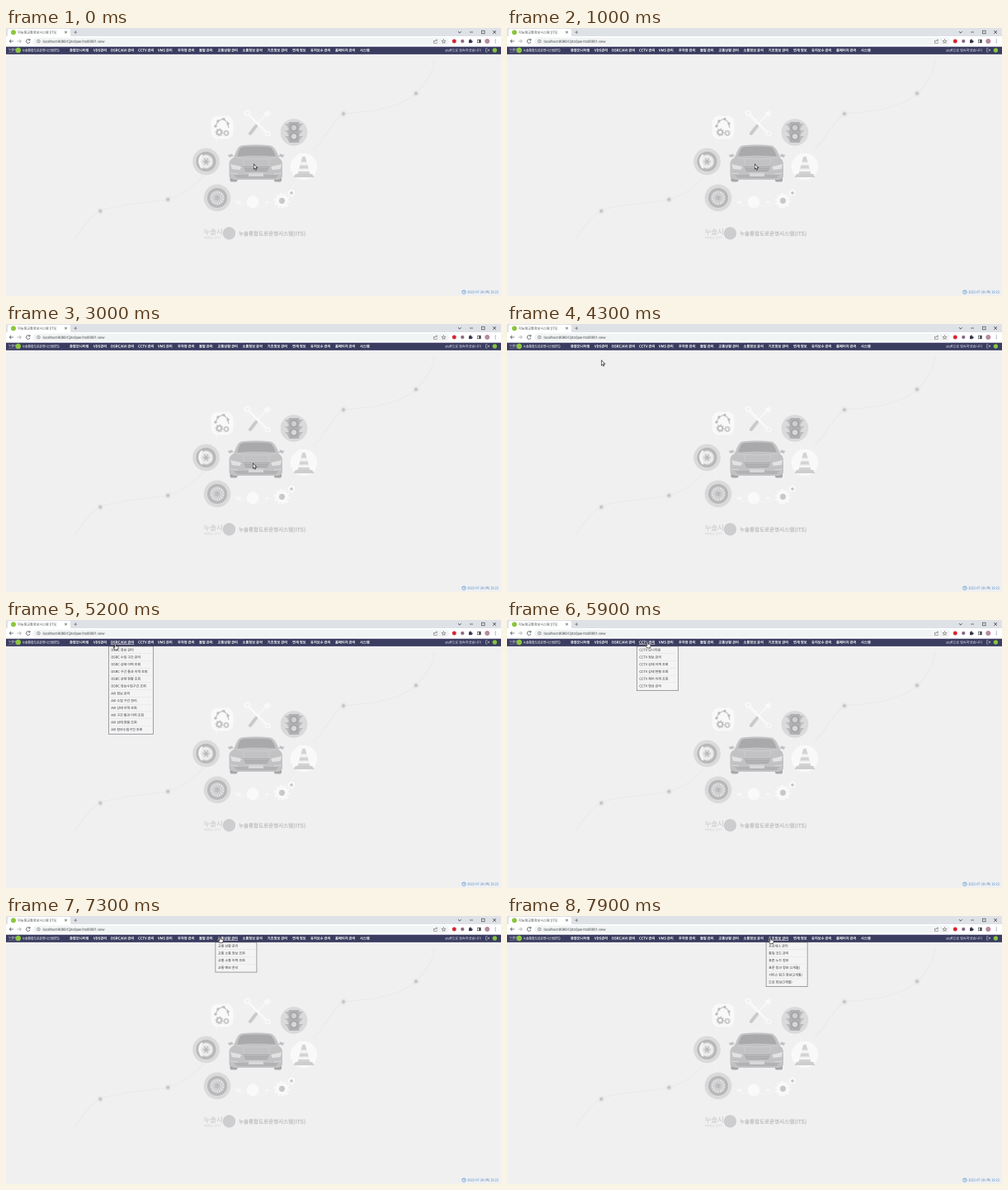
Animation, 600 px wide and 325 px high, one loop 8000 ms. Source, as an HTML page with a canvas:

```html
<!DOCTYPE html>
<html lang="ko">
<head>
<meta charset="utf-8">
<title>지능형교통정보시스템 [ITS]</title>
<style>
html, body { margin: 0; width: 100%; height: 100%; overflow: hidden; background: #f0f0f1; }
canvas { display: block; width: 600px; height: 325px; }
</style>
</head>
<body>
<canvas id="stage"></canvas>
<script>
const W = 600, H = 325, LOOP = 8000, STEP = 100;
const DETAIL = 4; // drawn large, then reduced, so that tiny text stays smooth

function sized(canvas, scale) {
  canvas.width = W * scale;
  canvas.height = H * scale;
  return canvas;
}
const stage = sized(document.getElementById('stage'), window.devicePixelRatio || 1);
const view = stage.getContext('2d');
const scene = sized(document.createElement('canvas'), DETAIL);
const ctx = scene.getContext('2d');
ctx.scale(DETAIL, DETAIL);
ctx.textRendering = 'geometricPrecision';
view.imageSmoothingQuality = 'high';

const KR = '"Noto Sans CJK KR", "Noto Sans CJK", "Noto Sans", sans-serif';
const LATIN = 'Roboto, "Noto Sans", sans-serif';
const SYSTEM = '누솔통합도로운영시스템(ITS)';

const dsrc = ['정보 관리', '수집 구간 관리', '상태 이력 조회', '구간 통과 이력 조회', '상태 현황 조회', '정보수집구간 조회'];
const prefix = (name, list) => list.map(s => name + ' ' + s);

// label, x, menu width, menu items
const NAV = [
  ['종합모니터링', 77],
  ['VDS관리', 106, 50, prefix('VDS', ['정보 관리', '수집 구간 관리', '상태 이력 조회', '상태 현황 조회', '차로 정보 관리', '수집 이력 조회', '제어 이력 조회', '정보수집 통계'])],
  ['DSRC/AVI 관리', 127, 54, [...prefix('DSRC', dsrc), ...prefix('AVI', dsrc)]],
  ['CCTV 관리', 160, 50, prefix('CCTV', ['모니터링', '정보 관리', '상태 이력 조회', '상태 현황 조회', '제어 이력 조회', '영상 관리'])],
  ['VMS 관리', 184, 51, ['VMS 현시 모니터링', 'VMS 정보 관리', 'VMS 정보제공 구간 관리', '폼 이미지 관리', 'VMS 폼관리', 'VMS 스케줄 관리', 'VMS 폼 매핑 관리', 'VMS 제어', 'VMS 영상 표출', 'VMS 상태 이력 조회', 'VMS 표출 이력 조회', 'VMS 제어 이력 조회', 'VMS 제공정보 통계']],
  ['주차장 관리', 208, 50, prefix('주차장', ['정보 관리', '상태 이력 조회', '상태 현황 조회', '이용 통계'])],
  ['돌발 관리', 234, 50, prefix('돌발', ['정보 관리', '이력 조회', '유형 관리', '정보 통계'])],
  ['교통상황 관리', 256.5, 50, prefix('교통', ['상황 관리', '소통 정보 조회', '소통 이력 조회', '예보 관리'])],
  ['소통정보 분석', 286.5, 50, [...prefix('구간', dsrc), ...prefix('링크', dsrc)]],
  ['기초정보 관리', 316.7, 50, ['프로세스 관리', '통일 코드 관리', '표준 노드 정보', '표준 링크 정보 (1개월)', '서비스 링크 정보(2개월)', '도로 정보(3개월)']],
  ['연계 정보', 347],
  ['유지보수 관리', 369],
  ['홈페이지 관리', 399],
  ['시스템', 429]
];

// pointer path: time, x, y
const PATH = [
  [0, 300.4, 165], [2500, 300.4, 165], [2700, 299.4, 169], [3100, 299.4, 169],
  [3400, 240, 127], [3600, 182, 92], [3750, 182, 92], [4100, 126, 52],
  [4300, 114.5, 44], [4500, 113, 29], [4800, 118, 28], [5000, 129, 28.5],
  [5200, 132.5, 28.5], [5500, 150, 28], [5750, 165, 27], [6000, 174, 26],
  [6300, 187, 25], [6600, 199.5, 25], [6900, 217, 25], [7150, 241, 25],
  [7400, 272, 25], [7650, 299, 26], [7850, 319.5, 26], [8000, 319.5, 26]
];

function pointerAt(t) {
  let i = 1;
  while (i < PATH.length - 1 && PATH[i][0] < t) i++;
  const [t0, x0, y0] = PATH[i - 1], [t1, x1, y1] = PATH[i];
  const k = (t - t0) / (t1 - t0);
  return [x0 + (x1 - x0) * k, y0 + (y1 - y0) * k];
}

function text(s, x, y, size, color, weight = 400, font = KR, spacing = 0) {
  ctx.font = `${weight} ${size}px ${font}`;
  ctx.letterSpacing = spacing + 'px';
  ctx.fillStyle = color;
  ctx.fillText(s, x, y + size * 0.38);
}

function rect(x, y, w, h, color, r = 0) {
  ctx.fillStyle = color;
  ctx.beginPath();
  ctx.roundRect(x, y, w, h, r);
  ctx.fill();
}

function disc(x, y, r, color) {
  ctx.fillStyle = color;
  ctx.beginPath();
  ctx.arc(x, y, r, 0, 7);
  ctx.fill();
}

function ring(x, y, r, color, width) {
  ctx.strokeStyle = color;
  ctx.lineWidth = width;
  ctx.beginPath();
  ctx.arc(x, y, r, 0, 7);
  ctx.stroke();
}

function stroke(d, color, width = 0.7) {
  ctx.strokeStyle = color;
  ctx.lineWidth = width;
  ctx.stroke(new Path2D(d));
}

function fill(d, color) {
  ctx.fillStyle = color;
  ctx.fill(new Path2D(d));
}

function gear(x, y, r, color, hole, teeth = 8) {
  ctx.fillStyle = color;
  ctx.beginPath();
  for (let i = 0; i < teeth * 4; i++) {
    const a = (i + 0.5) * Math.PI / (teeth * 2);
    const q = i % 4 < 2 ? r : r * 0.76;
    ctx.lineTo(x + q * Math.cos(a), y + q * Math.sin(a));
  }
  ctx.fill();
  disc(x, y, r * 0.36, hole);
}

function browser() {
  rect(0, 0, W, 10, '#dee1e6');
  rect(2, 1, 76, 12, '#fff', 2);
  disc(9, 5.3, 3, '#8cc63f');
  text('지능형교통정보시스템 [ITS]', 14, 5.2, 4.1, '#45484d');
  stroke('M71.2 3.8l2.6 2.6m0-2.6l-2.6 2.6M82.2 5.1h4m-2-2v4', '#55585c', 0.6);
  stroke('M548 4.2l1.8 1.8 1.8-1.8M562 5h4M576.5 3.2h3.6v3.6h-3.6zM590.3 3.2l3.6 3.6m0-3.6l-3.6 3.6', '#333', 0.6);

  rect(0, 10, W, 13, '#fff');
  stroke('M9 16H4.2m2-2l-2 2 2 2', '#55585c');
  stroke('M13.5 16h4.8m-2-2l2 2-2 2', '#a9acb0');
  stroke('M28.6 14.6a2.3 2.3 0 1 0 .4 2M29 13v1.9h-1.9', '#55585c');
  rect(33, 11.7, 504, 8.8, '#f1f3f4', 4.4);
  ring(39.4, 16.1, 1.8, '#606468', 0.5);
  stroke('M39.4 15.8v1.2M39.4 14.9v.4', '#606468', 0.5);
  text('localhost:8080/CjitsOper/its00001.view', 44.5, 16.1, 4.25, '#3c4043', 400, LATIN);

  stroke('M519.5 15.3h-1.2v3h4v-1.3M519.6 16.8q.5-2 2.8-2m-1-1.2l1.2 1.2-1.2 1.2', '#666', 0.5);
  stroke('M530.5 13.8l.7 1.5 1.7.2-1.2 1.1.3 1.7-1.5-.8-1.5.8.3-1.7-1.2-1.1 1.7-.2z', '#666', 0.5);
  disc(543.3, 16, 2.5, '#d8262f');
  disc(553.3, 16, 2.1, '#8a6a86');
  rect(561, 14.6, 3.6, 3.6, '#333a4c', 0.4);
  disc(562.8, 14.4, 0.9, '#333a4c');
  disc(564.8, 16.4, 0.9, '#333a4c');
  stroke('M571.5 14.2h3.8v3.6h-3.8z', '#35383c', 0.6);
  rect(573.4, 14.2, 1.9, 3.6, '#35383c');
  disc(583.3, 16, 3, '#b58c9c');
  for (const y of [14.1, 16, 17.9]) disc(593.2, y, 0.5, '#55585c');
}

function navBar(active) {
  rect(0, 22.7, W, 9.2, '#3a3c60');
  text('누솔시', 3, 26, 4, '#e6e8f0', 500, KR, -0.3);
  text('NUSOL.CITY', 3, 29.2, 1.8, '#b9bccd', 400, LATIN);
  disc(14.8, 27, 3.3, '#8cc63f');
  text(SYSTEM, 19.5, 27, 4.2, '#fff', 500, KR, -0.4);
  NAV.forEach(([label, x], i) => {
    text(label, x, 26.9, 4.25, '#fff', 700);
    if (i === active) rect(x, 29, ctx.measureText(label).width, 0.5, '#fff');
  });
  text('staff으로 접속하셨습니다', 532, 27, 4.2, '#eceef5');
  stroke('M583.5 24.8h-1.7v4.2h1.7M583 26.9h2.7m-1.1-1.2l1.2 1.2-1.2 1.2', '#e2e4ee', 0.5);
  disc(592.4, 27, 2.7, '#86c440');
}

function trail() {
  ctx.setLineDash([1.6, 1.2]);
  stroke('M84 255C94 240 102 228 114 222C136 213 170 213 196 208C216 202 228 192 240 179M372 148C385 138 392 117 409 104C432 101 471 102 497 79C509 67 518 54 519 38', '#e2e2e4', 0.7);
  ring(303, 163, 54, '#f8f8f8', 0.8);
  ctx.setLineDash([]);
  for (const [x, y] of [[114.3, 222], [196.3, 208], [409, 104], [497, 79.3]]) {
    disc(x, y, 3.6, '#e5e5e6');
    disc(x, y, 1.8, '#c2c2c4');
  }
}

function car() {
  fill('M276 157C279 149 281 144 285 142.6Q303 140.4 321 142.6C325 144 328 149 331 157z', '#c4c4c6');
  fill('M280 155.5C283 147 284 145 287 144.4Q303 142.6 319 144.4C322 145 324 148 327 155.5z', '#a9a9ac');
  rect(271.5, 176, 9, 10.5, '#a6a6a9', 2);
  rect(325, 176, 9, 10.5, '#a6a6a9', 2);
  fill('M270.5 180V165Q270.5 159 278 156Q303 153.4 328 156Q335 159 335 165V180Q334.5 183 329 184H278Q271.5 183 270.5 180z', '#c2c2c4');
  fill('M268.8 154l5-1.4 2 2.8-5 1.6zM337.4 154l-5-1.4-2 2.8 5 1.6z', '#c2c2c4');
  stroke('M279 157Q303 161 328 157M287 159l2 7M320 159l-2 7', '#d2d2d3', 0.7);
  fill('M272 165l13 3-1 4-10-1zM334.5 165l-13 3 1 4 10-1z', '#e2e2e3');
  fill('M287 168h33l-3 6h-27z', '#a6a6a9');
  stroke('M286 169.7h35M288 172h31', '#dcdcdd', 0.5);
  fill('M276 178h54l-3 4H280z', '#b2b2b4');
  rect(294, 176, 18, 4, '#d8d8d9', 0.5);
  stroke('M272 176l9 1M334 176l-9 1', '#e0e0e1', 0.8);
}

function wheel(x, y, spokes) {
  disc(x, y, 16.3, '#dadadb');
  disc(x, y, 12, '#b8b8ba');
  disc(x, y, 8.5, '#e2e2e3');
  ctx.strokeStyle = '#bfbfc1';
  ctx.lineWidth = 1;
  ctx.beginPath();
  for (let i = 0; i < spokes; i++) {
    const a = i * 2 * Math.PI / spokes;
    ctx.moveTo(x + 2 * Math.cos(a), y + 2 * Math.sin(a));
    ctx.lineTo(x + 8 * Math.cos(a), y + 8 * Math.sin(a));
  }
  ctx.stroke();
  disc(x, y, 2.4, '#bcbcbe');
}

function icons() {
  rect(248.5, 106.5, 27, 28, '#f9f9f9', 8);
  gear(258.5, 126.5, 5, '#c3c3c5', '#f9f9f9');
  gear(267, 127.5, 4, '#c9c9ca', '#f9f9f9');
  stroke('M254 119l3-6 6-3 5 4 2 7', '#c6c6c8', 1.3);
  for (const [x, y] of [[254, 119], [257, 113], [264, 110.5], [269, 116]]) disc(x, y, 1.7, '#bebec0');

  ctx.lineCap = 'round';
  stroke('M294 105l21 21', '#f9f9f9', 3);
  stroke('M315 105l-11 12', '#f9f9f9', 1.6);
  stroke('M303 119l-7 9', '#cacacb', 4);
  ring(292.5, 103.5, 3, '#f9f9f9', 2);
  ring(317, 128, 2.7, '#f9f9f9', 1.6);
  ctx.lineCap = 'butt';
  fill('M312 103l6-3 3 3-4 5z', '#f9f9f9');

  disc(349, 126.5, 16.3, '#dadadb');
  for (const y of [116, 124, 131]) fill(`M338 ${y}h22l-4 5h-14z`, '#bebec0');
  rect(342.5, 114, 13, 25, '#b0b0b3', 2);
  for (const [y, c] of [[121, '#cfcfd1'], [131.5, '#d8d8d9']]) {
    disc(349, y, 4.5, '#9f9fa2');
    disc(349, y, 3.3, c);
  }

  wheel(242.5, 162, 6);
  ring(242.5, 162, 6, '#eeeeef', 2.4);
  stroke('M238 154Q231 161 238 170', '#f6f6f6', 2.6);
  wheel(256, 206, 14);

  disc(361, 168, 16.3, '#f9f9f9');
  fill('M359.3 156h3.4l5.8 21h-15z', '#d3d3d5');
  fill('M357.6 162.5h6.8l1.2 4h-9.2zM355.4 170.5h11.2l1 3.5h-13.2z', '#f4f4f4');
  fill('M351 177h20l2.5 4h-25z', '#cdcdcf');

  disc(299, 211, 7.5, '#f9f9f9');
  rect(279, 209.5, 6, 4, '#f7f7f7', 2);
  rect(314, 210, 5, 3, '#f7f7f7', 1.5);
  gear(334.5, 209.5, 10, '#f9f9f9', '#c9c9cb', 10);
  gear(346, 200, 4.8, '#f9f9f9', '#c4c4c6');
}

function page() {
  rect(0, 31, W, H - 31, '#f0f0f1');
  trail();
  icons();
  car();
  text('누솔시', 239.5, 246.8, 8.8, '#c8c8ca', 400, KR, -0.4);
  text('NUSOL.CITY', 240, 254, 3.7, '#d2d2d4', 400, LATIN);
  disc(270.5, 249, 7.6, '#cdcdcf');
  text(SYSTEM, 282, 249.2, 6.6, '#bdbdbf', 700, KR, -0.05);
  ring(555, 320.2, 2.2, '#3c86cf', 0.6);
  stroke('M555 318.8v1.5h1.1', '#3c86cf', 0.5);
  text('2022-07-28 (목) 19:22', 559.3, 320.1, 3.9, '#3c80c4');
}

function menu([, x, w, items]) {
  const top = 31.9, gap = 8.77, h = items.length * gap + 1.1;
  rect(x - 3, top, w + 0.4, h, '#f4f4f5');
  ctx.strokeStyle = '#68686c';
  ctx.lineWidth = 0.6;
  ctx.strokeRect(x - 2.6, top, w, h);
  items.forEach((item, i) => {
    const y = 36.2 + i * gap;
    text(item, x + 0.4, y, 4.1, '#36363a');
    if (i) rect(x - 1.5, y - gap / 2, w - 3, 0.4, '#dededf');
  });
}

function pointer(x, y, hand) {
  ctx.save();
  ctx.translate(x, y);
  const d = hand
    ? 'M-.6.6Q0-.5.6.6V3L3 3.5Q3.8 3.8 3.6 5L3 7.5H-.6L-2.4 4.8Q-2.3 3.8-1.4 4.2L-.6 5z'
    : 'M0 0V6.3L1.4 5 2.4 7.2 3.4 6.8 2.4 4.6H4.4z';
  fill(d, '#fff');
  stroke(d, '#222', 0.6);
  ctx.restore();
}

function hovered(x, y) {
  if (y > 31) return -1;
  return NAV.findIndex(([, left], i) => {
    const next = NAV[i + 1];
    return x >= left - 3 && (!next || x < next[1] - 3);
  });
}

function draw(t) {
  const [x, y] = pointerAt(t);
  const active = hovered(x, y);
  page();
  browser();
  navBar(active);
  if (active >= 0 && NAV[active][3]) menu(NAV[active]);
  pointer(x, y, active >= 0);
  view.drawImage(scene, 0, 0, stage.width, stage.height);
}

const start = performance.now();
let shown = -1;
function tick() {
  const t = (performance.now() - start) % LOOP;
  const step = Math.floor(t / STEP);
  if (step !== shown) draw(step * STEP);
  shown = step;
  requestAnimationFrame(tick);
}
tick();
</script>
</body>
</html>
```
